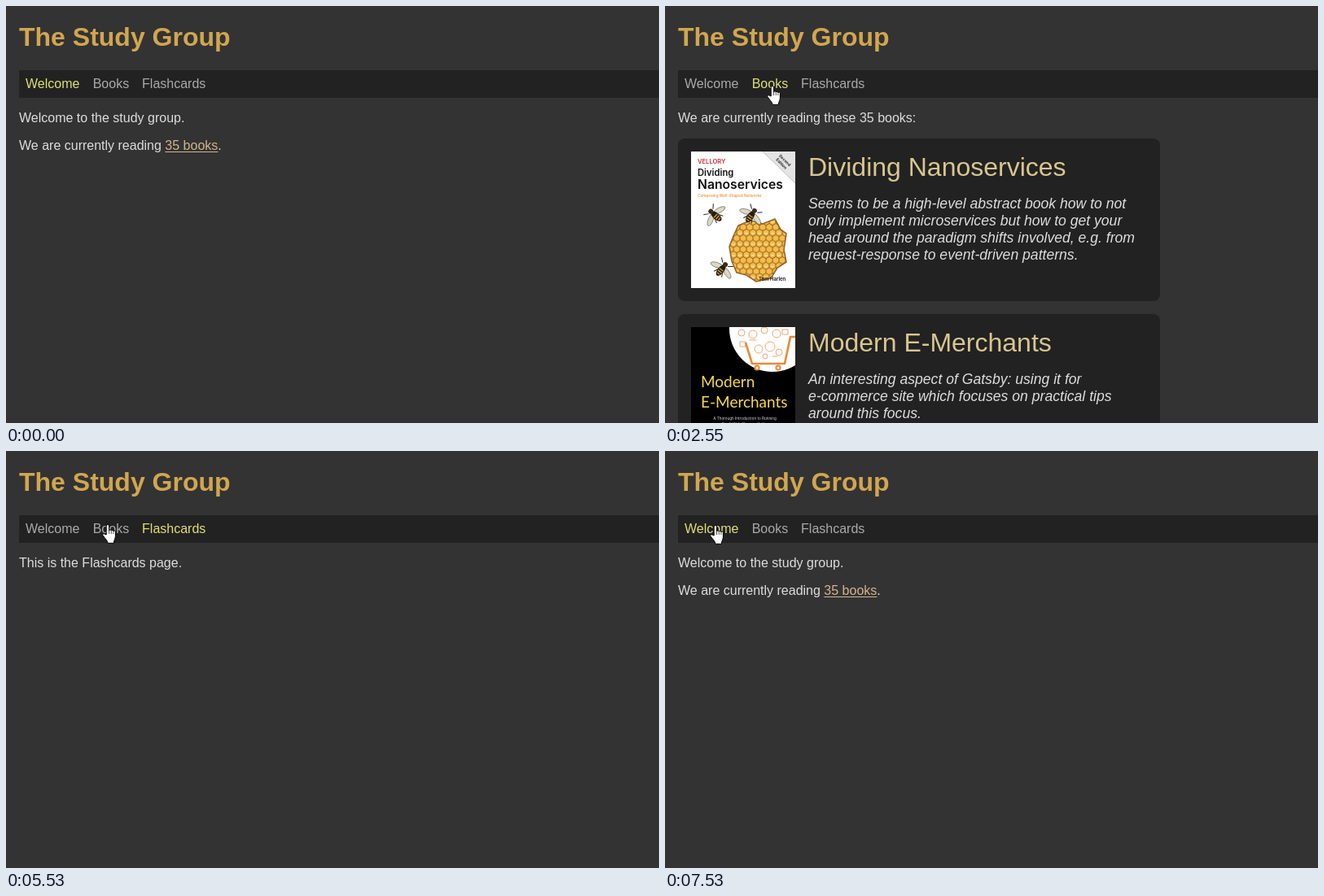
These frames come from a looping animation (802x513 px, 8 s). An HTML page:

```html
<!DOCTYPE html>
<html lang="en">
<head>
<meta charset="utf-8">
<title>The Study Group</title>
<style>
html, body { margin: 0; width: 100%; height: 100%; overflow: hidden; background: #333; }
svg { display: block; width: 802px; height: 513px; }
text { font: 16px "Liberation Sans", Arial, sans-serif; fill: #ddd; }
.head { font-size: 32px; font-weight: bold; fill: #d1a650; }
.nav text { fill: #aaa; }
.nav .on { fill: #dfdf73; }
.link { fill: #d2b48c; }
.title { font-size: 32px; fill: #d8c690; }
.note text { font-size: 17.6px; font-style: italic; }
.cover text { font-family: Inter, sans-serif; font-weight: 600; fill: #111; }
.cover .wide { font-family: Lato, sans-serif; font-size: 19px; font-weight: 400; fill: #f6d84c; }
.cover .tiny { font-size: 4.6px; font-weight: 400; fill: #ddd; text-anchor: middle; }
</style>
</head>
<body>
<svg viewBox="0 0 802 513">
  <defs>
    <pattern id="cells" width="8" height="13.6" patternUnits="userSpaceOnUse">
      <rect width="8" height="13.6" fill="#f3bd4b"/>
      <path d="M4 0V2.3L0 4.5V9.1L4 11.4V13.6M4 2.3L8 4.5V9.1L4 11.4" fill="none" stroke="#96601f"/>
      <path d="M2.5 7a1.6 1.6 0 0 0 3 0" fill="none" stroke="#fff0b4"/>
    </pattern>
    <g id="bee">
      <path d="M-4-5L-9-9M4-5L9-9M-4 0L-9 4M4 0L9 4M-3 4L-6 10M3 4L6 10" stroke="#222" fill="none"/>
      <g fill="#ddd8c4" stroke="#555" stroke-width=".6">
        <ellipse cx="-8" cy="-1" rx="8" ry="3" transform="rotate(-20)"/>
        <ellipse cx="8" cy="-1" rx="8" ry="3" transform="rotate(20)"/>
      </g>
      <ellipse cy="4" rx="4" ry="8" fill="#251d12"/>
      <path d="M-3 3H3M-3 6H3M-2 9H2" stroke="#d99a2b" stroke-width="1.3"/>
      <circle cy="-5" r="3" fill="#3b2d1a"/>
    </g>
    <clipPath id="black"><rect x="32" y="395" width="128" height="118"/></clipPath>
  </defs>

  <text class="head" x="16" y="49">The Study Group</text>
  <rect x="16" y="79" width="786" height="34" fill="#222"/>
  <g class="nav">
    <text x="24" y="101">Welcome</text>
    <text x="106.7" y="101">Books</text>
    <text x="167.1" y="101">Flashcards</text>
  </g>

  <g class="page">
    <text x="16" y="143">Welcome to the study group.</text>
    <text x="16" y="177">We are currently reading <tspan class="link">35 books</tspan>.</text>
    <path d="M195.3 179.5H260.4" stroke="#d2b48c"/>
  </g>

  <g class="page">
    <text x="16" y="143">We are currently reading these 35 books:</text>
    <g fill="#222">
      <rect x="16" y="163" width="592" height="200" rx="8"/>
      <rect x="16" y="379" width="592" height="200" rx="8"/>
    </g>
    <text class="title" x="176" y="209">Dividing Nanoservices</text>
    <g class="note">
      <text x="176" y="249">Seems to be a high-level abstract book how to not</text>
      <text x="176" y="270">only implement microservices but how to get your</text>
      <text x="176" y="291">head around the paradigm shifts involved, e.g. from</text>
      <text x="176" y="312">request-response to event-driven patterns.</text>
    </g>
    <text class="title" x="176" y="425">Modern E-Merchants</text>
    <g class="note">
      <text x="176" y="465">An interesting aspect of Gatsby: using it for</text>
      <text x="176" y="486">e-commerce site which focuses on practical tips</text>
      <text x="176" y="507">around this focus.</text>
    </g>

    <g class="cover">
      <rect x="32" y="179" width="128" height="168" fill="#fff"/>
      <path d="M120 179H160V218Z" fill="#e4e4e4"/>
      <path d="M120 179L160 218" stroke="#aaa" stroke-width=".7"/>
      <g transform="translate(146 191) rotate(45)" text-anchor="middle">
        <text style="font-size:5px">Second</text>
        <text y="6" style="font-size:5px">Edition</text>
      </g>
      <text x="40" y="194" style="font-size:7.6px;fill:#c8343f">VELLORY</text>
      <text x="40" y="209" style="font-size:11.2px">Dividing</text>
      <text x="40" y="225" style="font-size:15.7px">Nanoservices</text>
      <text x="40" y="235" style="font-size:4.7px;font-weight:500;fill:#e88f2e">Composing Well-Shaped Networks</text>
      <path d="M79 296L84 283 90 270 105 264 120 268 135 262 142 275 149 280 146 300 149 315 138 322 130 335 112 339 100 331 88 328 82 314Z"
        fill="url(#cells)" stroke="#94642a" stroke-width="1.6" stroke-linejoin="round"/>
      <use href="#bee" transform="translate(60 256) rotate(-48)"/>
      <use href="#bee" transform="translate(107 256) rotate(35)"/>
      <use href="#bee" transform="translate(71 322) rotate(38)"/>
      <text x="115" y="338" style="font-size:6px">Tom Harlen</text>
    </g>

    <g class="cover" clip-path="url(#black)">
      <rect x="32" y="395" width="128" height="118"/>
      <circle cx="132" cy="397" r="53" fill="#fff"/>
      <g fill="none" stroke="#e9a878">
        <circle cx="94" cy="402" r="4"/><circle cx="108" cy="404" r="5"/>
        <circle cx="122" cy="399" r="4"/><circle cx="137" cy="403" r="5"/>
        <circle cx="115" cy="422" r="5"/><circle cx="129" cy="419" r="6"/>
        <circle cx="140" cy="426" r="4"/><circle cx="123" cy="431" r="3"/>
        <path d="M92 413h7v6h-7zM104 411h8M144 398h7v6h-7zM132 431h6"/>
      </g>
      <path d="M160 407H154L147 440H107L99 414" fill="none" stroke="#e88a36" stroke-width="2.6" stroke-linejoin="round"/>
      <g fill="#fff" stroke="#e88a36" stroke-width="2"><circle cx="113" cy="445" r="2.6"/><circle cx="139" cy="445" r="2.6"/></g>
      <text class="wide" x="44" y="469">Modern</text>
      <text class="wide" x="44" y="494">E-Merchants</text>
      <text class="tiny" x="98" y="509">A Thorough Introduction to Running</text>
      <text class="tiny" x="98" y="515.5">Small Web Shops with the</text>
    </g>
  </g>

  <g class="page"><text x="16" y="143">This is the Flashcards page.</text></g>

  <g id="cursor" fill="#fff" stroke="#000" stroke-linejoin="round">
    <path d="M.5.5V16.5L4.2 13 6.6 18.5 8.8 17.5 6.4 12.2H11.5Z"/>
    <g>
      <path d="M5.2 13V2.2a1.7 1.7 0 0 1 3.4 0V8a1.3 1.3 0 0 1 2.7.3a1.3 1.3 0 0 1 2.6.7a1.2 1.2 0 0 1 2.5.8V15c0 3-1.8 4-2 8.3H7C6.6 20 3.6 17.5.9 13.8c-.7-1.6 1-2.7 2.3-1.6Z"/>
      <path d="M8.6 8v4M11.3 8.5V12M13.9 9.3V12" stroke-width=".7"/>
    </g>
  </g>
</svg>
<script>
const LOOP = 8000, NONE = -1, ARROW = 0, HAND = 1;
const WELCOME = 0, BOOKS = 1, CARDS = 2;
const visits = [[0, WELCOME], [2550, BOOKS], [4280, CARDS], [5900, BOOKS], [7530, WELCOME]];
// time, left, top, shape
const moves = [
  [0, 0, 0, NONE],
  [1020, 211, 369, ARROW], [1170, 207, 342, ARROW], [1290, 190, 284, ARROW],
  [1420, 164, 228, ARROW], [1540, 148, 199, ARROW],
  [1690, 141, 152, ARROW], [1810, 136, 125, ARROW],
  [1960, 124, 100, HAND], [2240, 125, 98, HAND],
  [3430, 125, 97, HAND], [3580, 126, 97, HAND], [3860, 174, 97, HAND], [4010, 180, 97, HAND],
  [5140, 174, 97, HAND], [5260, 163, 97, ARROW], [5410, 132, 92, HAND], [5530, 118, 90, HAND],
  [7020, 82, 89, HAND], [7140, 62, 90, HAND], [7260, 55, 91, HAND]
];
const pages = document.querySelectorAll('.page');
const tabs = document.querySelectorAll('.nav text');
const cursor = document.getElementById('cursor');
const current = (steps, t) => steps.findLast(step => step[0] <= t);
const showOnly = (items, chosen) =>
  [...items].forEach((item, i) => item.style.display = i === chosen ? '' : 'none');

function draw(now) {
  const t = now % LOOP;
  const page = current(visits, t)[1];
  const [, x, y, shape] = current(moves, t);
  showOnly(pages, page);
  tabs.forEach((tab, i) => tab.classList.toggle('on', i === page));
  showOnly(cursor.children, shape);
  cursor.setAttribute('transform', `translate(${x} ${y})`);
}

const start = performance.now();
function tick() {
  draw(performance.now() - start);
  requestAnimationFrame(tick);
}
tick();
</script>
</body>
</html>
```
